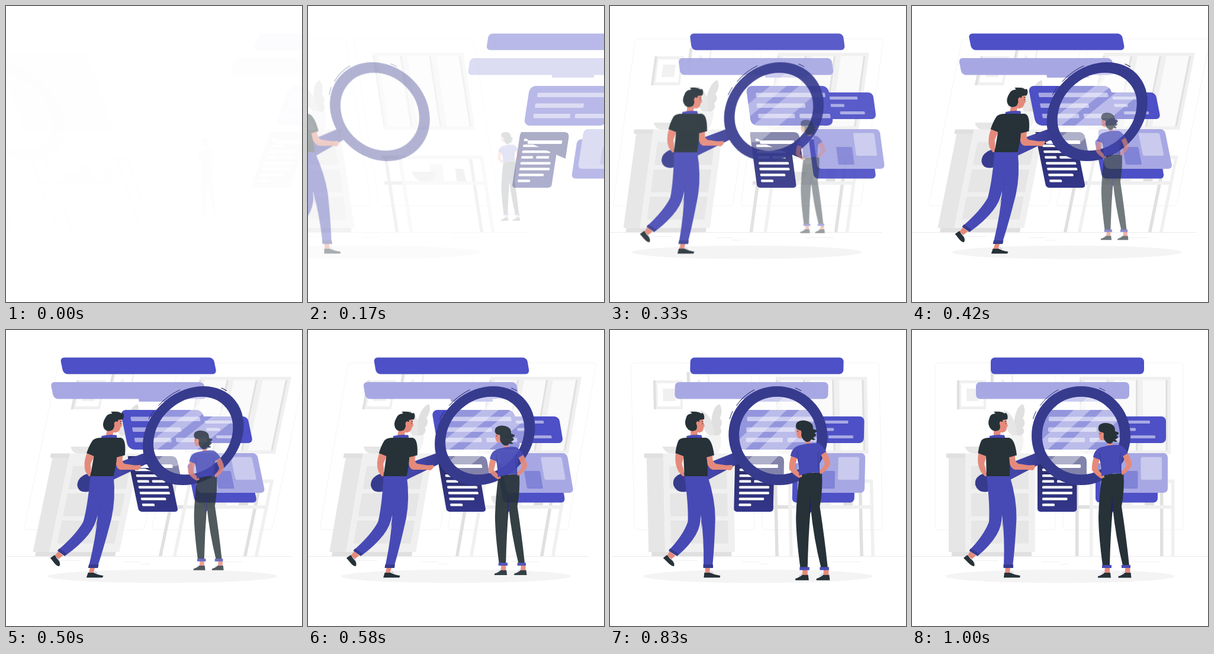
An HTML page that plays this animation: 500x500 px, repeating every 1040 ms.

```html
<!DOCTYPE html>
<html>
<head>
<meta charset="utf-8">
<style>
html, body { margin: 0; width: 100%; height: 100%; overflow: hidden; background: #fff; }
svg { display: block; width: 100vw; height: 100vh; }
</style>
</head>
<body>
<svg viewBox="0 0 500 500" xmlns="http://www.w3.org/2000/svg">
  <defs>
    <clipPath id="lens"><circle cx="285.5" cy="178.5" r="66"/></clipPath>
    <linearGradient id="paper" x1="0" y1="0" x2="0" y2="1">
      <stop offset="0" stop-color="#2b2d68"/><stop offset="1" stop-color="#33368a"/>
    </linearGradient>
    <linearGradient id="grip" x1="0" y1="0" x2="1" y2="0">
      <stop offset=".15" stop-color="#373b8e"/><stop offset=".6" stop-color="#4447a8"/><stop offset="1" stop-color="#373b8e"/>
    </linearGradient>
  </defs>
  <g id="room"></g>
  <ellipse id="shadow" cx="250" cy="416" rx="194" ry="11.3" fill="#f4f4f4"/>
  <g id="panels"></g>
  <g id="man"></g>
  <g id="woman"></g>
</svg>
<script>
const INK = '#263238', BLUE = '#4d50c6', CLOTH = '#474ab5', NAVY = '#373b8e',
  PALE = '#a7a8e3', SKIN = '#e58a7b', WHITE = '#fff',
  G1 = '#e0e0e0', G2 = '#e6e6e6', G3 = '#f0f0f0', G4 = '#fafafa';

const el = id => document.getElementById(id);
// box by its left, top, right and bottom edges
const box = (l, t, r, b, fill, round = 0) =>
  `<rect x="${l}" y="${t}" width="${r - l}" height="${b - t}" rx="${round}" fill="${fill}"/>`;
const shape = (d, fill) => `<path d="${d}" fill="${fill}"/>`;
const line = (d, color, width = 1) =>
  `<path d="${d}" fill="none" stroke="${color}" stroke-width="${width}" stroke-linecap="round"/>`;
const each = (list, draw) => list.map(draw).join('');

el('room').innerHTML =
  each([39, 255], x => `<rect x="${x}" y="55.5" width="203" height="282" rx="5" fill="none" stroke="#f4f4f4"/>`) +
  // window
  box(283, 79, 437, 209, G3) + box(287, 84.5, 432, 203.5, G3) +
  each([292, 341, 390], x => box(x, 84.5, x + 38, 203.5, G4)) +
  each([283, 329, 378, 428.5], x => box(x, 84.5, x + 3, 203.5, G1)) +
  // pictures
  box(76, 85, 125, 134, G3) + box(76, 85, 80, 134, G1) + box(83, 90, 121, 129, WHITE) + box(92, 99, 113, 120, G3) +
  box(133, 71, 171, 107, G3) + box(133, 71, 137, 107, G1) + box(139, 75, 168, 103, WHITE) + shape('M146 95L153 82L161 95Z', G3) +
  // plant and bowl
  shape('M171 180C172 160 172 131 187 125C192 132 191 142 187 149C193 155 190 161 187 165C192 171 188 178 180 180Z', G1) +
  shape('M172 180C158 172 152 150 155 136C165 138 176 150 178 180Z', G2) +
  shape('M160 178H188Q190 198 182 209H167Q158 198 160 178Z', '#f3f3f3') +
  shape('M89 197H136Q131 209 119 209H106Q94 209 89 197Z', G2) +
  // cabinet
  box(67, 375, 202, 383, G1) + box(62, 209, 90, 375, G2) + box(90, 209, 208, 375, G3) +
  box(58, 208.5, 90, 216, G1) + box(90, 208.5, 212, 216, G3) +
  each([230, 276, 322], y => box(100, y, 197, y + 38.5, G2)) +
  // table
  each([276, 419], x => box(x, 257, x + 5.5, 382.5, G1)) + each([300, 438], x => box(x, 257, x + 5.5, 382.5, G3)) +
  box(272, 252.5, 300, 258.5, G1) + box(300, 252.5, 443.5, 258.5, G3) +
  box(270, 296, 300, 302, G1) + box(300, 296, 440, 302, G3) +
  box(351, 267, 372, 296, G3) + shape('M319 280H360Q356 296 345 296H334Q323 296 319 280Z', G2) +
  shape('M393 275H407L409 296H393Z', G1) +
  // floor
  line('M0 382.5H500', '#ebebeb') +
  line('M100 389.5H145M220 391.5H248M249 395.5H264M372 391.5H419', '#efefef');

const row = (y, spans, h, fill) => each(spans, s => box(s[0], y, s[1], y + h, fill, 1.5));
el('panels').innerHTML =
  box(133, 46.5, 392, 74.5, BLUE, 7) +
  box(108, 88, 367, 116.5, PALE, 7) + box(251, 111, 322, 121, PALE) +
  box(300, 146, 429, 191, BLUE, 8) +
  row(153, [[340, 402]], 5, PALE) + row(165.5, [[340, 378]], 5, PALE) + row(178, [[369, 411]], 5, PALE) +
  box(216, 135, 355, 202, BLUE, 10) +
  row(146.5, [[231, 348]], 7.5, PALE) + row(164.5, [[230, 312]], 7.5, PALE) +
  row(182, [[230, 292], [300, 352]], 7.5, PALE) +
  box(310, 225, 415, 291.5, BLUE, 7) + box(318.5, 208, 432, 275, PALE, 7) +
  box(354.5, 238, 381.5, 268, '#8183d7', 2) + box(386.5, 214.5, 422, 253, '#c9caee', 3) +
  box(212, 213, 278.5, 307, 'url(#paper)', 5) +
  row(224, [[220, 228]], 4.3, WHITE) + row(234, [[220, 249]], 4.3, WHITE) + row(244, [[220, 268]], 4.3, WHITE) +
  row(253.5, [[220, 240], [245, 267]], 4.3, WHITE) +
  each([[263.5, 271], [273.3, 271], [283.3, 262.5], [293.2, 241]], a => row(a[0], [[220, a[1]]], 4.3, WHITE)) +
  shape('M212 213H286Q295 213 295 222V258L237 234Q225 226 212 213Z', '#2f3173') +
  row(227, [[227, 285]], 6, WHITE);

el('man').innerHTML =
  shape('M214 206L117 244Q105 250 107 262Q112 276 128 273L219 225Z', 'url(#grip)') +
  // glass
  '<circle cx="285.5" cy="178.5" r="66" fill="#fff" opacity=".4"/>' +
  '<g clip-path="url(#lens)" fill="#fff" opacity=".36">' +
  '<path d="M300 110H328L208 222H180ZM348 110H392L268 230H224Z"/></g>' +
  `<circle cx="285.5" cy="178.5" r="74.6" fill="none" stroke="${NAVY}" stroke-width="17.8"/>` +
  line('M216.5 127.5A86 86 0 0 1 247 101M204.5 150A86 86 0 0 1 209.5 137.5M316.5 98A86 86 0 0 1 326 102.5', '#2b2e6e') +
  // far arm, feet
  shape('M112 208Q109 226 116 239L123 247H126L125 237L122 226L126 212Z', SKIN) +
  shape('M98 374L108 381L101 387L94 381Z', SKIN) + shape('M158 400H166L165 412H157Z', SKIN) +
  shape('M87 385L93.5 380Q98 386 103 390Q107 396 105 399Q101 399 96 394Z', INK) +
  shape('M156 410H166Q174 414 183 415L182 418.3H155Z', INK) +
  line('M167 408L171 410M101 386L102 389', '#b9baf0') +
  // trousers
  shape('M126 246H165Q177 285 176.5 318Q174 368 170 399H155Q157 350 152 312Q152 331 143 346Q132 364 113 380L98 371Q122 346 130 324Q132 298 126 246Z', CLOTH) +
  shape('M149 279Q154 300 153.5 317L152 338Q157 310 149 279Z', NAVY) +
  shape('M99 369L114 378L111 382L96.5 373Z', NAVY) + box(154.5, 396, 171, 402, NAVY) +
  // head
  shape('M138 166L150 170L149 180L138 182Z', SKIN) +
  shape('M147 151L159 150L160 157L162 162L160 164Q160 172 154 173Q148 174 146 168Z', SKIN) +
  shape('M131 148Q126 160 134 168Q140 173 147 169Q149 167 149 162Q146 156 150 154Q154 157 153 152Q158 151 161 151Q163 145 159 140Q156 142 153 139Q146 137 138 138L141 141Q132 142 131 148Z', INK) +
  line('M157.5 154.5H159', INK) + `<circle cx="158.5" cy="158" r=".8" fill="${INK}"/>` +
  shape('M131 179Q143 176 156 177.5L158 184H131Z', CLOTH) +
  // shirt and near arm
  shape('M163 214L174 211Q173 224 180 226L197 228.5L207 228Q210 232 204 237L195 236L174 236Q164 233 163 214Z', SKIN) +
  shape('M131 182Q120 182 117 187Q113 196 111.5 208L125 213L126 247H165Q166 226 164 215L177 211.5Q174 184 164 182Z', INK);

el('woman').innerHTML =
  // feet
  each([0, 34.5], x => shape(`M${326 + x} 400H${334 + x}V412H${325 + x}Z`, SKIN) +
    shape(`M${325 + x} 410H${335 + x}L${336 + x} 418.6H${314 + x}V416Q${321 + x} 414 ${325 + x} 410Z`, INK) +
    line(`M${324 + x} 408L${320 + x} 412`, '#b9baf0')) +
  // trousers
  shape('M321 246Q339 242 357.5 242Q359 272 354 298Q362 350 367 398H356Q344 350 339 300Q335 350 334 398H322Q315 345 315 315Q316 280 321 246Z', INK) +
  shape('M338 277L336 312L340 306Z', '#20235e') +
  box(321, 397, 337, 402, CLOTH) + box(354, 397, 369, 402, CLOTH) +
  // arms
  shape('M307 215Q303 228 304 237Q311 246 320 251L325 249Q325 243 320 242L313 235L317 218Z', SKIN) +
  shape('M363 206Q372 220 371 229Q366 239 355 245L353 240Q362 232 362 227L356 213Z', SKIN) +
  // blouse
  shape('M331 186H338L339 197L331 199Z', SKIN) +
  shape('M323 197Q338 193 352 194.5Q359 198 364.5 208L355 214Q353 230 354 242Q337 241 320 247Q320 230 317 219L306 215Q308 200 323 197Z', CLOTH) +
  line('M352 208Q350 220 353 240M319 221L317 208', NAVY) + line('M330 242V246M348 240V243', '#3d4ab0') +
  // head
  shape('M316 170Q315 176 316 181Q318 188 324 186L332 190L334 172L322 166Z', SKIN) +
  shape('M316 161Q312 170 320 173Q324 172 324 177Q322 185 330 191Q337 194 340 188Q344 190 347 188L343 185Q348 183 348 180L345 178Q350 176 349 173L343 171Q344 161 334 158Q322 155 316 161Z', INK) +
  `<circle cx="318" cy="175" r=".8" fill="${INK}"/>`;

// cubic-bezier(.36, -.01, .5, 1.38)
const bez = (a, b, s) => 3 * (1 - s) * (1 - s) * s * a + 3 * (1 - s) * s * s * b + s * s * s;
function ease(x) {
  if (x <= 0) return 0;
  if (x >= 1) return 1;
  let lo = 0, hi = 1;
  for (let i = 0; i < 30; i++) {
    const mid = (lo + hi) / 2;
    if (bez(.36, .5, mid) < x) lo = mid; else hi = mid;
  }
  return bez(-.01, 1.38, lo);
}
const tan = deg => Math.tan(deg * Math.PI / 180);

// slides in from a side (1 = right, -1 = left) while the skew swings and settles
function rush(id, side, midY, ms) {
  let shift = 0, skew, alpha = 1;
  if (ms < 600) {
    const p = ease(ms / 600);
    shift = 250 * (1 - p);
    skew = -tan(20) + (tan(10) + tan(20)) * p;
    alpha = Math.max(0, Math.min(1, p));
  } else if (ms < 800) skew = tan(10 - 12 * ease((ms - 600) / 200));
  else skew = -tan(2) * (1 - ease((ms - 800) / 200));
  skew *= side;
  el(id).setAttribute('transform', `matrix(1 0 ${skew} 1 ${shift * side - skew * midY} 0)`);
  el(id).setAttribute('opacity', alpha);
}

function zoom(id, x, y, ms) {
  const p = ease(ms / 1000), k = .5 + .5 * p;
  el(id).setAttribute('transform', `translate(${x} ${y}) scale(${k}) translate(${-x} ${-y})`);
  el(id).setAttribute('opacity', Math.max(0, Math.min(1, p)));
}

const LOOP = 1040, STEP = 1000 / 24, LEAD = 33;
const start = performance.now();
function draw() {
  const t = (performance.now() - start) % LOOP;
  const n = Math.floor((t + 5) / STEP);
  const ms = (n < 2 ? 0 : n * STEP) + LEAD;
  rush('room', -1, 225, ms);
  rush('shadow', -1, 416, ms);
  rush('panels', 1, 177, ms);
  rush('man', -1, 256, ms);
  zoom('woman', 342, 288, ms);
  requestAnimationFrame(draw);
}
draw();
</script>
</body>
</html>
```
